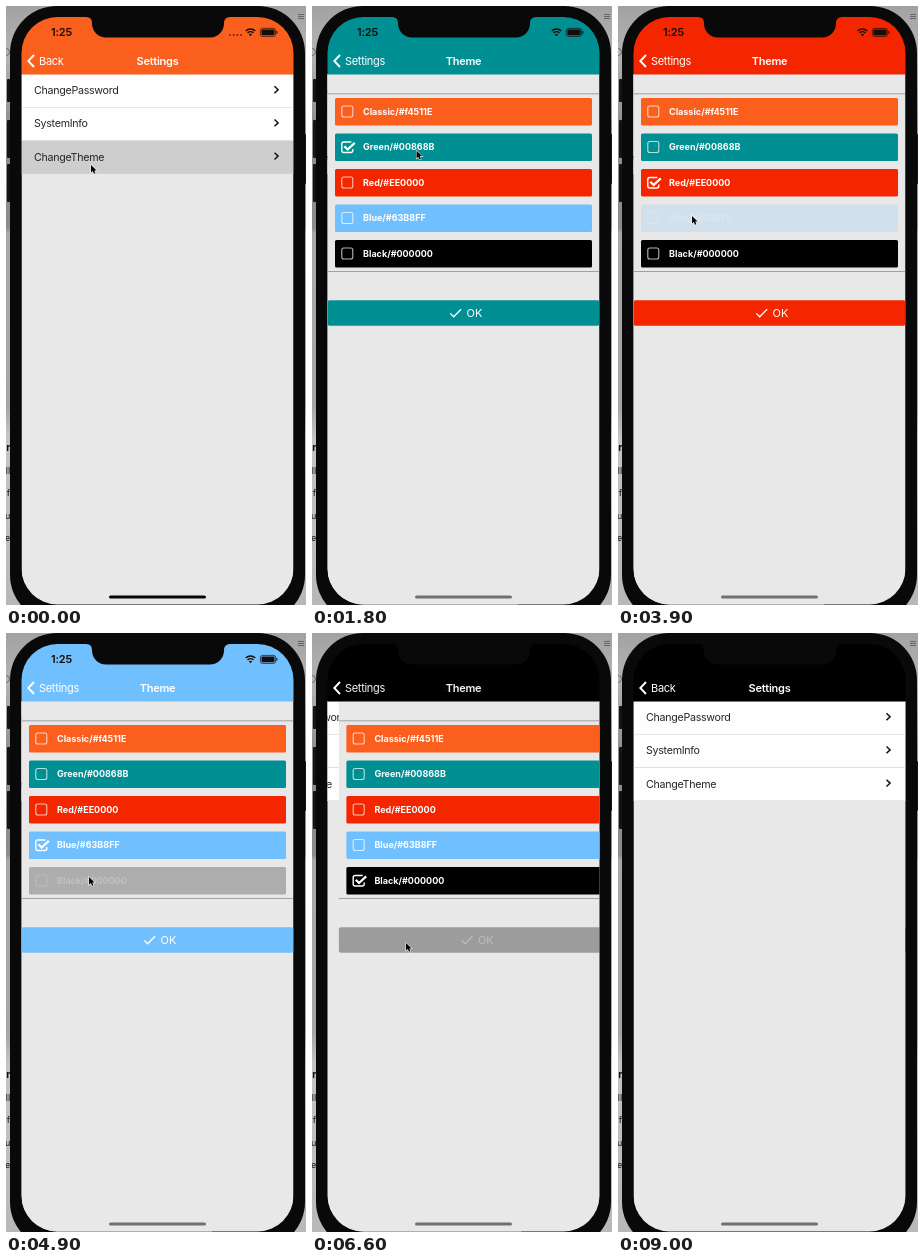
Recreate the animation shown at these times as an HTML page with a canvas. Size 300x599 px, loop 9100 ms.

```html
<!DOCTYPE html>
<html lang="en">
<head>
<meta charset="utf-8">
<title>Theme settings</title>
<style>
html, body { margin: 0; width: 100%; height: 100%; overflow: hidden; background: #aaa; }
canvas { display: block; width: 300px; height: 599px; }
</style>
</head>
<body>
<canvas id="stage"></canvas>
<script>
const W = 300, H = 599, LOOP = 9100, STEP = 100;
const SANS = 'Inter, Roboto, sans-serif';
const PAGE = '#e8e8e8', BEZEL = '#090909';
const SCREEN = { x: 15.5, y: 11, w: 272, h: 587.5 };
const ROWS = ['ChangePassword', 'SystemInfo', 'ChangeTheme'];

// release: when the touch on a card ends and its theme is applied
const THEMES = [
  { label: 'Classic/#f4511E', color: '#fb5f1e', release: -1000 },
  { label: 'Green/#00868B', color: '#009093', release: 1490 },
  { label: 'Red/#EE0000', color: '#f32600', release: 2790 },
  { label: 'Blue/#63B8FF', color: '#70c0ff', release: 3990 },
  { label: 'Black/#000000', color: '#000000', release: 5060 }
];
const PUSH = 370, OK_RELEASE = 6560, POP = 6594, SLIDE = 500;

// time, x, y of the pointer tip
const POINTER = [
  [0, 85, 159], [200, 85, 159], [700, 110, 138], [1600, 110, 138],
  [2400, 75, 181], [2950, 75, 181], [3600, 74, 210], [4150, 74, 210],
  [4700, 83, 244], [5300, 83, 244], [6100, 94, 310], [7300, 94, 310],
  [8400, 84, 612]
];

const canvas = document.getElementById('stage');
const ctx = canvas.getContext('2d');
const dpr = window.devicePixelRatio || 1;
canvas.width = Math.round(W * dpr);
canvas.height = Math.round(H * dpr);

const clamp = v => Math.max(0, Math.min(1, v));
const mix = (a, b, k) => a + (b - a) * k;
const smooth = k => k * k * (3 - 2 * k);

// cubic-bezier(.2833, .99, .3183, .99)
function slide(u) {
  u = clamp(u);
  const curve = (s, a, b) => 3 * (1 - s) ** 2 * s * a + 3 * (1 - s) * s * s * b + s ** 3;
  let lo = 0, hi = 1;
  for (let i = 0; i < 24; i++) {
    const mid = (lo + hi) / 2;
    if (curve(mid, 0.2833, 0.3183) < u) lo = mid; else hi = mid;
  }
  return curve(lo, 0.99, 0.99);
}

function touchAlpha(t, release) {
  const down = clamp((t - release + 300) / 150);
  const up = clamp((t - release) / 250);
  return t < release ? mix(1, 0.2, down) : mix(0.2, 1, up);
}

function withAlpha(a, draw) {
  ctx.save();
  ctx.globalAlpha *= a;
  draw();
  ctx.restore();
}

function box(x, y, w, h, color, r = 0) {
  ctx.fillStyle = color;
  ctx.beginPath();
  ctx.roundRect(x, y, w, h, r);
  ctx.fill();
}

function line(points, color, width) {
  ctx.strokeStyle = color;
  ctx.lineWidth = width;
  ctx.beginPath();
  points.forEach(([x, y], i) => i ? ctx.lineTo(x, y) : ctx.moveTo(x, y));
  ctx.stroke();
}

function text(s, x, y, color, size, weight = 400, align = 'left', spacing = 0) {
  ctx.font = `${weight} ${size}px ${SANS}`;
  ctx.letterSpacing = spacing + 'px';
  ctx.textAlign = align;
  ctx.textBaseline = 'alphabetic';
  ctx.fillStyle = color;
  ctx.fillText(s, x, y);
}

function drawDesk() {
  const g = ctx.createLinearGradient(0, 0, 0, H);
  [[0, '#a2a2a2'], [0.08, '#b4b4b4'], [0.2, '#8e8e8e'], [0.37, '#8c8c8c'],
   [0.38, '#a8a8a8'], [0.67, '#a6a6a6'], [0.72, '#c4c4c4'], [1, '#b8b8b8']]
    .forEach(([k, c]) => g.addColorStop(k, c));
  ctx.fillStyle = g;
  ctx.fillRect(0, 0, W, H);
  ctx.strokeStyle = '#666';
  ctx.lineWidth = 1;
  ctx.beginPath();
  ctx.arc(0, 46, 3.5, -1.5, 1.5);
  ctx.stroke();
  for (let y = 8; y < 14; y += 2) box(292, y, 6, 1, '#666');
  ['or', 'll', 'f', 'u', 'e'].forEach((s, i) =>
    text(s, 4.2, 445 + i * 22.5, '#111', i ? 9 : 10, i ? 400 : 700, 'right'));
  [[73, 23], [114, 38], [158, 38]].forEach(([y, h]) => box(1, y, 5, h, '#141414', 1));
  box(297, 128, 3, 50, '#141414', 1);
  box(4, 0, 295, 616, BEZEL, 47);
}

function drawSettings(x, pressed) {
  box(x, 68, 272, 531, PAGE);
  ROWS.forEach((label, i) => {
    const y = 68.5 + i * 33.2;
    box(x, y, 272, 33.2, pressed && i === 2 ? '#cecece' : '#fefefe');
    box(x, y + 32.6, 272, 0.6, '#d6d6d6');
    text(label, x + 12.5, y + 19.6, '#262626', 10.7, 400, 'left', -0.3);
    line([[x + 253, y + 11.8], [x + 256.6, y + 15.2], [x + 253, y + 18.6]], '#161616', 1.5);
  });
}

function drawCheckbox(x, y, checked) {
  const color = checked ? '#fff' : 'rgba(255,255,255,.72)';
  ctx.strokeStyle = color;
  ctx.lineWidth = checked ? 1.4 : 1.1;
  ctx.beginPath();
  if (checked) {
    ctx.moveTo(x + 9.5, y + 0.5);
    ctx.lineTo(x + 2, y + 0.5);
    ctx.arcTo(x, y + 0.5, x, y + 2.5, 2);
    ctx.arcTo(x, y + 11, x + 2, y + 11, 2);
    ctx.arcTo(x + 11, y + 11, x + 11, y + 9, 2);
    ctx.lineTo(x + 11, y + 7.5);
  } else {
    ctx.roundRect(x, y, 11, 11, 2);
  }
  ctx.stroke();
  if (checked) line([[x + 2.6, y + 4.8], [x + 5.8, y + 8], [x + 13, y + 1.4]], '#fff', 2.2);
}

function drawTheme(x, t, active) {
  box(x, 68, 272, 531, PAGE);
  [87.5, 265.3].forEach(y => box(x, y, 272, 0.8, '#8a8a8a'));
  THEMES.forEach((theme, i) => {
    const y = 92 + i * 35.5;
    withAlpha(touchAlpha(t, theme.release), () => {
      box(x + 7.5, y, 257, 27.5, theme.color, 1.5);
      drawCheckbox(x + 14.3, y + 8, i === active);
      text(theme.label, x + 35.5, y + 16.9, '#fff', 9, 700);
    });
  });
  withAlpha(touchAlpha(t, OK_RELEASE), () => {
    box(x, 294.2, 272, 25.6, THEMES[active].color, 2);
    line([[x + 122.8, 307.4], [x + 126.2, 310.8], [x + 133.6, 303.2]], '#fff', 1.3);
    text('OK', x + 139, 311, '#fff', 11, 400);
  });
}

function drawHeader(color, p, active) {
  box(15, 10, 273, 58.5, color);
  line([[28, 49], [22.3, 55], [28, 61]], '#fff', 1.9);
  const titles = (a, back, title) => withAlpha(a, () => {
    text(back, 33, 59, '#fff', 11, 400, 'left', -0.3);
    text(title, 151.5, 59, '#fff', 11, 600, 'center', -0.25);
  });
  titles(1 - p, 'Back', 'Settings');
  titles(p, 'Settings', 'Theme');

  const ink = active === 4 ? '#000' : '#160d08';
  text('1:25', 45, 30.4, ink, 11, 600, 'left', -0.2);
  if (active === 0) {
    for (let i = 0; i < 4; i++) box(223 + i * 3.7, 28, 1.9, 1.9, 'rgba(60,10,0,.7)', 1);
  }
  ctx.strokeStyle = ink;
  ctx.lineWidth = 1.5;
  [6.9, 4.2].forEach(r => {
    ctx.beginPath();
    ctx.arc(244.5, 30, r, -2.33, -0.81);
    ctx.stroke();
  });
  ctx.fillStyle = ink;
  ctx.beginPath();
  ctx.moveTo(244.5, 30.3);
  ctx.arc(244.5, 30, 2.2, -2.4, -0.74);
  ctx.fill();
  ctx.lineWidth = 0.7;
  ctx.beginPath();
  ctx.roundRect(254.4, 22.4, 15.2, 8, 2);
  ctx.stroke();
  box(255.5, 23.5, 13, 5.8, ink, 1);
  box(270.4, 25, 1, 2.8, ink, 0.5);
}

function drawNotch() {
  ctx.fillStyle = BEZEL;
  ctx.beginPath();
  ctx.moveTo(80, 10);
  ctx.lineTo(80, 11);
  ctx.quadraticCurveTo(86, 11, 86, 17);
  ctx.arcTo(86, 31.5, 100, 31.5, 14);
  ctx.arcTo(218, 31.5, 218, 17, 14);
  ctx.quadraticCurveTo(218, 11, 224, 11);
  ctx.lineTo(224, 10);
  ctx.fill();
}

function drawPointer(t) {
  const i = POINTER.findIndex(p => p[0] > t);
  if (i < 0) return;
  const [t0, x0, y0] = POINTER[i - 1], [t1, x1, y1] = POINTER[i];
  const k = smooth((t - t0) / (t1 - t0));
  ctx.save();
  ctx.translate(mix(x0, x1, k), mix(y0, y1, k));
  ctx.beginPath();
  [[0, 0], [0, 7.6], [1.8, 6], [3, 8.8], [4.4, 8.2], [3.2, 5.4], [5.6, 5.4]]
    .forEach(([x, y]) => ctx.lineTo(x, y));
  ctx.closePath();
  ctx.strokeStyle = 'rgba(255,255,255,.85)';
  ctx.lineWidth = 1.1;
  ctx.stroke();
  ctx.fillStyle = '#000';
  ctx.fill();
  ctx.restore();
}

function render(t) {
  ctx.setTransform(dpr, 0, 0, dpr, 0, 0);
  let active = 0;
  THEMES.forEach((theme, i) => { if (t >= theme.release) active = i; });
  const p = t < POP ? slide((t - PUSH) / SLIDE) : 1 - slide((t - POP) / SLIDE);

  drawDesk();
  ctx.save();
  ctx.beginPath();
  ctx.roundRect(SCREEN.x, SCREEN.y, SCREEN.w, SCREEN.h, 36);
  ctx.clip();
  drawSettings(SCREEN.x - p * SCREEN.w * 0.3, t < PUSH);
  if (p > 0) drawTheme(SCREEN.x + (1 - p) * SCREEN.w, t, active);
  drawHeader(THEMES[active].color, p, active);
  drawNotch();
  box(103, 589.4, 97, 3.2, t < PUSH ? '#050505' : '#707070', 1.6);
  ctx.restore();
  drawPointer(t);
}

const start = performance.now();
function tick() {
  const t = (performance.now() - start) % LOOP;
  render(Math.floor(t / STEP) * STEP);
  requestAnimationFrame(tick);
}
tick();
</script>
</body>
</html>
```
